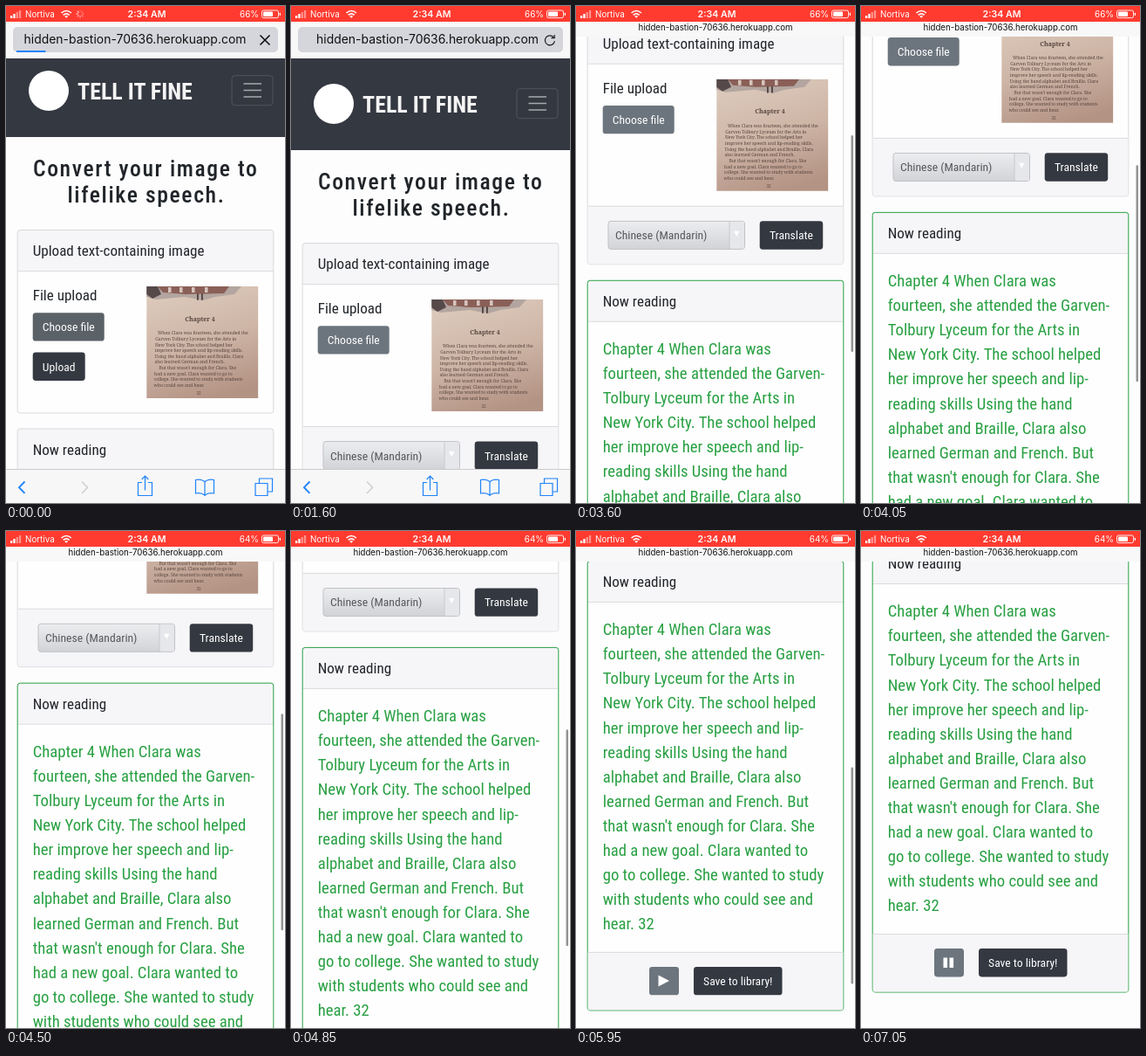
Write an HTML page that moves like this. It is 320 px wide and 569 px high and loops after 8000 ms.

```html
<!DOCTYPE html>
<html lang="en">
<head>
<meta charset="utf-8">
<title>Reading app</title>
<style>
html, body { margin: 0; width: 100%; height: 100%; overflow: hidden; background: #fdfdfe; }
svg { display: block; width: 100%; height: 100%; }
text { white-space: pre; }
.ui { font-family: Inter, Roboto, sans-serif; }
.plain { font-family: Roboto, sans-serif; }
.cond { font-family: "Roboto Condensed", Roboto, sans-serif; font-stretch: 75%; }
.book { font-family: "Noto Serif", "Liberation Serif", serif; fill: #57443d; }
</style>
</head>
<body>
<svg id="stage" viewBox="0 0 320 569" xmlns="http://www.w3.org/2000/svg"></svg>
<script>
const LOOP = 8000, LOADED = 1000;
const DARK = '#343841', GRAY = '#6c757d', GREEN = '#28a042', INK = '#212529', BLUE = '#1f83f8', RED = '#ff3b30';
const PANEL = '#f6f5f8', LINE = '#dcdcde';
const stage = document.getElementById('stage');
const $ = id => document.getElementById(id);
const clamp = (v, a = 0, b = 1) => Math.min(b, Math.max(a, v));
const lerp = (a, b, u) => a + (b - a) * u;
const set = (id, attrs) => { for (const k in attrs) $(id).setAttribute(k, attrs[k]); };

// If no condensed face is installed, narrow the regular one by its usual ratio.
function condensedScale() {
  const probe = 'Upload text-containing image';
  stage.innerHTML = ['cond', 'plain'].map(c => `<text class="${c}" font-size="40">${probe}</text>`).join('');
  const [a, b] = [...stage.children].map(e => e.getComputedTextLength());
  return a < b * 0.95 ? 1 : 0.88;
}
const K = condensedScale();

const rect = (x, y, w, h, fill, extra = '') =>
  `<rect x="${x}" y="${y}" width="${w}" height="${h}" fill="${fill}" ${extra}/>`;
const path = (d, extra = '') => `<path d="${d}" fill="none" ${extra}/>`;
const cond = (x, y, size, str, fill = INK, extra = '') =>
  `<text class="cond" transform="translate(${x} ${y}) scale(${K} 1)" font-size="${size}" fill="${fill}" ${extra}>${str}</text>`;
const ui = (x, y, size, str, extra = '') =>
  `<text class="ui" x="${x}" y="${y}" font-size="${size}" ${extra}>${str}</text>`;
const button = (x, y, w, label, fill, id = '') =>
  rect(x, y, w, 32.4, fill, `rx="3.4" ${id && `id="${id}"`}`) +
  cond(x + w / 2, y + 21, 13.65, label, '#fff', 'text-anchor="middle"');
const card = (y, h, title, stroke) =>
  rect(13.2, y, 293.6, h, '#fff', `rx="3" fill-opacity=".6"`) +
  rect(13.2, y, 293.6, 47, PANEL, 'rx="3"') +
  rect(13.2, y + 46.5, 293.6, 1, LINE) +
  rect(13.2, y, 293.6, h, 'none', `rx="3" stroke="${stroke}"`) +
  cond(30.7, y + 29.6, 17.07, title);
const footer = (y, h) => rect(13.7, y, 292.6, h, PANEL) + rect(13.7, y, 292.6, 1, LINE);

const STORY = [
  'Chapter 4 When Clara was', 'fourteen, she attended the Garven-', 'Tolbury Lyceum for the Arts in',
  'New York City. The school helped', 'her improve her speech and lip-', 'reading skills Using the hand',
  'alphabet and Braille, Clara also', 'learned German and French. But', "that wasn't enough for Clara. She",
  'had a new goal. Clara wanted to', 'go to college. She wanted to study', 'with students who could see and', 'hear. 32'];
const PRINT = [
  '  When Clara was fourteen, she attended the', 'Garven Tolbury Lyceum for the Arts in', 'New York City. The school helped her',
  'improve her speech and lip-reading skills.', 'Using the hand alphabet and Braille, Clara', 'also learned German and French.',
  "    But that wasn't enough for Clara. She", 'had a new goal. Clara wanted to go to', 'college. She wanted to study with students',
  'who could see and hear.'];

function photo() {
  const line = (s, i) => `<text class="book" x="${171.4 - i * 0.2}" y="${331.2 + i * 6.65}" font-size="5.05">${s}</text>`;
  return `<g clip-path="url(#photoClip)">` + rect(161, 276, 128.5, 128.5, 'url(#paper)') +
    `<path d="M161 276H270L262 285L240 288L226 292L205 288L172 291L161 288Z" fill="#b3a59f"/>
     <path d="M174 276H256L250 284L206 285L180 283Z" fill="#8a5f57"/>
     <path d="M161 276H174L178 285L168 290L161 285Z" fill="#55494a"/>` +
    [186, 199, 213, 228].map(x => rect(x, 277, 3.5, 6, '#d6c5bd')).join('') +
    [219, 224].map(x => rect(x, 284, 1.8, 8, '#4c4040', 'rx=".9"')).join('') +
    `<text class="book" x="222.5" y="315.7" font-size="7" font-weight="700" text-anchor="middle">Chapter 4</text>` +
    PRINT.map(line).join('') +
    `<text class="book" x="221" y="400" font-size="4.6" text-anchor="middle">32</text></g>`;
}

const nav = rect(0, 0, 320, 105, DARK) +
  `<circle cx="49" cy="52" r="23" fill="#fff"/>` +
  cond(82, 61.5, 26, 'TELL IT FINE', '#f4f4f4', 'font-weight="700"') +
  rect(259, 34.7, 47, 34, 'none', 'rx="3.5" stroke="#50555d"') +
  path('M272.500 44h20.500M272.500 51.500h20.500M272.500 59h20.500', 'stroke="#a5a8ad" stroke-width="1.6"');

const heading = ['Convert your image to', 'lifelike speech.'].map((s, i) =>
  cond([31, 70.5][i], 150 + i * 30.4, 25.6, s, INK, `font-weight="500" letter-spacing="${1.62 / K}"`)).join('');

const select = rect(37, 438.6, 156.5, 32, 'url(#sel)', 'rx="3" stroke="#c0c1c5"') +
  rect(176, 439.1, 17, 31, '#e6e7ea', 'rx="2"') + rect(175.5, 439.1, 1, 31, '#c8c9cd') +
  `<path d="M181 450h6.500l-3.250 6z" fill="#fff"/>` +
  cond(45, 459.6, 13.65, 'Chinese (Mandarin)', '#55585c');

const upload = height => card(211.5, height, 'Upload text-containing image', '#d9d9db') +
  cond(30.7, 292, 17.07, 'File upload') + photo();

const pageBefore = upload(209.5) + button(30.7, 306.2, 82, 'Choose file', '#5a6268') +
  button(30.7, 351.5, 60, 'Upload', DARK) + card(439, 180, 'Now reading', '#d9d9db');

const pageAfter = upload(276.5) + button(30.7, 306.2, 82, 'Choose file', GRAY) +
  footer(421, 66.5) + select + button(210.7, 438.5, 72.5, 'Translate', DARK) +
  card(506.5, 514.5, 'Now reading', GREEN) +
  STORY.map((s, i) => cond(30.7, 591.3 + i * 28.08, 18.72, s, GREEN)).join('') +
  footer(954, 66.5) +
  button(84, 971, 34, '', GRAY, 'playBtn') +
  `<path id="play" d="M94.500 980.700v13l12.500-6.500z" fill="#fff"/>
   <path id="pause" d="M94.500 981.500h4.600v11.500h-4.600zM101.500 981.500h4.600v11.500h-4.600z" fill="#fff"/>` +
  button(135, 971, 101.5, 'Save to library!', DARK);

const status = rect(0, 0, 320, 18, RED) + `<g fill="#fff">` +
  [0, 1, 2, 3].map(i => rect(5 + i * 3.3, 11 - i * 2, 2.3, 3 + i * 2, '#fff', i > 1 ? 'opacity=".45"' : '')).join('') +
  ui(22, 13, 9.8, 'Nortiva') +
  path('M63.500 8q5.700-5 11.400 0M65.700 10.300q3.500-3 7 0', 'stroke="#fff" stroke-width="1.6"') +
  `<path d="M67.200 11.700q2-1.600 4 0l-2 2.100z"/>` +
  `<g id="spinner" stroke="#fff" stroke-width="1">` +
  [...Array(8).keys()].map(i => `<path d="M0-2v-2.600" opacity="${0.25 + i * 0.1}" transform="rotate(${i * 45})"/>`).join('') + `</g>` +
  ui(161.500, 13, 10.6, '2:34 AM', 'text-anchor="middle" font-weight="600"') +
  ui(290, 13, 9.9, '', 'text-anchor="end" id="charge"') +
  rect(293.500, 5, 19, 8.600, 'none', 'rx="2" stroke="#fff" stroke-width=".9"') +
  rect(295, 6.500, 11, 5.600, '#fff', 'rx="1"') + rect(313.700, 7.700, 1.300, 3.200, '#fff', 'rx=".6"') + `</g>`;

const icon = d => path(d, `stroke="${BLUE}" stroke-width="1.2"`);
const toolbar = `<g id="toolbar">` + rect(0, 530, 320, 40, '#f7f7f8') + rect(0, 530, 320, .7, '#b8b8ba') +
  path('M21.500 544.500l-6.500 6.700 6.500 6.700', `stroke="${BLUE}" stroke-width="1.9"`) +
  path('M87 544.500l6.500 6.700-6.500 6.700', 'stroke="#cfcfd2" stroke-width="1.5"') +
  icon('M156 545.500h-4.500v15h16v-15h-4.500M159.500 554.500v-16M155.700 542l3.800-3.800 3.800 3.800') +
  icon('M228 544.500q-4.500-3.500-10.500-2v15.500q6-1.500 10.500 2zM228 544.500q4.500-3.500 10.500-2v15.500q-6-1.500-10.500 2z') +
  icon('M286 546.500h14v14h-14zM290.500 546.500v-5.500h15v15h-5.500') + `</g>`;

stage.innerHTML = `
  <defs>
    <clipPath id="photoClip"><rect x="161.300" y="276" width="128" height="128"/></clipPath>
    <linearGradient id="paper" x1=".3" y1="0" x2=".6" y2="1">
      <stop offset="0" stop-color="#dccabc"/><stop offset=".5" stop-color="#ceb5a6"/><stop offset="1" stop-color="#b39384"/>
    </linearGradient>
    <linearGradient id="sel" x1="0" y1="0" x2="0" y2="1">
      <stop offset="0" stop-color="#ecedef"/><stop offset="1" stop-color="#d2d3d7"/>
    </linearGradient>
  </defs>
  ${rect(0, 0, 320, 569, '#fdfdfe')}
  <g id="page">${nav}${heading}<g id="before">${pageBefore}</g><g id="after">${pageAfter}</g></g>
  <rect id="thumb" x="315.500" width="2.500" rx="1.250" fill="#000"/>
  <rect id="bar" width="320" fill="#f8f8f8"/>
  <rect id="pill" y="24" rx="5" fill="#d5d6dc"/>
  <rect id="progress" x="12" y="51" height="2" fill="${BLUE}"/>
  <g id="url">${ui(0, 0, 13.95, 'hidden-bastion-70636.herokuapp.com', 'text-anchor="middle" fill="#111"')}</g>
  <g id="stop">${path('M291.500 33.500l11 11M302.500 33.500l-11 11', 'stroke="#111" stroke-width="1.6"')}</g>
  <g id="reload">${path('M4.600-2.600a5.500 5.500 0 1 0 .8 3.600M5.200-6v3.700h-3.700', 'stroke="#222" stroke-width="1.200"')}</g>
  ${status}${toolbar}`;

// Page top over time after loading: [ms, y]
const SCROLL = [[2620, 60], [2900, 52], [3600, -192], [4050, -270], [4850, -373], [5450, -426],
  [5750, -426], [5950, -472], [6250, -493]];
const slopes = SCROLL.slice(1).map(([t, y], i) => (y - SCROLL[i][1]) / (t - SCROLL[i][0]));
// Monotone tangents: harmonic mean of neighbouring slopes
const tangents = SCROLL.map((_, i) => {
  const a = slopes[i - 1], b = slopes[i];
  return a && b ? 2 * a * b / (a + b) : 0;
});

function pageTop(t) {
  if (t < LOADED) return 45;
  const n = SCROLL.length;
  if (t <= SCROLL[0][0]) return SCROLL[0][1];
  if (t >= SCROLL[n - 1][0]) return SCROLL[n - 1][1];
  const i = SCROLL.findIndex(p => p[0] > t) - 1;
  const [t0, y0] = SCROLL[i], [t1, y1] = SCROLL[i + 1];
  const h = t1 - t0, u = (t - t0) / h, v = 1 - u;
  return (1 + 2 * u) * v * v * y0 + u * v * v * h * tangents[i] +
    u * u * (3 - 2 * u) * y1 - u * u * v * h * tangents[i + 1];
}

function draw(t) {
  const loaded = t >= LOADED, top = pageTop(t);
  const c = loaded ? clamp((60 - top) / 25) : 0;
  const show = (id, on) => set(id, { visibility: on ? 'visible' : 'hidden' });

  set('page', { transform: `translate(0 ${top})` });
  show('before', !loaded);
  show('after', loaded);
  show('spinner', t < 1200);
  show('stop', t < 1200);
  show('reload', t >= 1200 && c < 0.7);
  show('play', loaded && t < 7000);
  show('pause', t >= 7000);
  set('playBtn', { fill: t >= 6950 && t < 7050 ? '#5a6268' : GRAY });

  set('spinner', { transform: `translate(85 9) rotate(${Math.floor(t / 100) * 45})` });
  $('charge').textContent = t < 4500 ? '66%' : '64%';

  // Address bar shrinks with the first pixels of scrolling
  set('bar', { height: 60 - 25 * c });
  set('pill', { x: 8 + 47 * c, width: 304 - 94 * c, height: 29 - 18 * c, opacity: clamp(1 - 2.2 * c) });
  const mid = t < 1200 ? 148 : lerp(156.5, 160, c);
  set('url', { transform: `translate(${mid} ${43.3 - 14.9 * c}) scale(${1 - 0.304 * c})` });
  set('reload', { transform: `translate(${297 - 40 * c} ${39 - 14 * c}) scale(${1 - 0.3 * c})`, opacity: clamp(1 - 2.6 * c) });
  set('toolbar', { transform: `translate(0 ${40 * c})` });

  const end = t < 850 ? lerp(45, 289, 1 - (1 - t / 850) ** 1.5) : lerp(289, 308, clamp((t - 850) / 200));
  set('progress', { width: end - 12, opacity: 1 - clamp((t - 1050) / 250) });

  // The scroll thumb is cut short by the address bar
  const thumbTop = 148 - 0.437 * (top + 192), y = Math.max(57, thumbTop);
  set('thumb', {
    y,
    height: thumbTop + 248 - y,
    opacity: 0.42 * clamp((t - 2600) / 100) * (1 - clamp((t - 6250) / 250))
  });
}

const start = performance.now();
function tick() {
  draw((performance.now() - start) % LOOP);
  requestAnimationFrame(tick);
}
draw(0);
requestAnimationFrame(tick);
</script>
</body>
</html>
```
